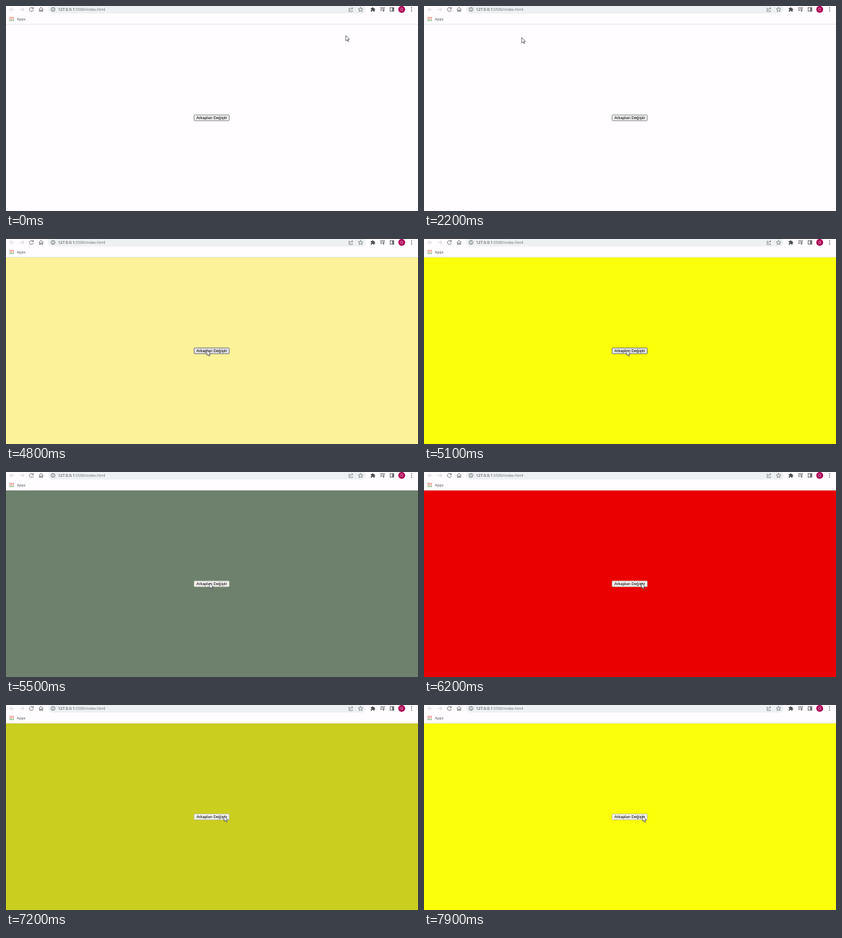
An HTML page that plays this animation: 599 px wide and 299 px high, repeating every 8000 ms.

```html
<!DOCTYPE html>
<html lang="tr">
<head>
<meta charset="utf-8">
<title>Arkaplan Değiştir</title>
<style>
  html, body { margin: 0; width: 100%; height: 100%; overflow: hidden; background: #fffdff; }
  svg { display: block; width: 100%; height: 100%; text-rendering: geometricPrecision; }
  .ui { font-family: "Open Sans", "Noto Sans", sans-serif; }
  .icon { fill: none; stroke: #4c4f53; stroke-width: .75; }
  .thin { stroke-width: .6; }
  .solid { fill: #4c4f53; }
  .off { stroke: #c3c5c8; }
  .apps { stroke-width: 1.4; stroke-dasharray: 1.4 .9; }
  .label { font: 5.9px "Liberation Sans", Arial, sans-serif; }

  #page, #cursor, #button { animation: 8s infinite; }
  #page { animation-name: recolor; animation-timing-function: linear; }
  #cursor { animation-name: move; animation-timing-function: ease-in-out; }
  #button { animation-name: press; animation-timing-function: step-end; }

  @keyframes recolor {
    0%, 57.5% { fill: #fffdff; }
    60% { fill: #fcf29a; }
    62.5%, 65% { fill: #fcff0a; }
    68.75% { fill: #6d816d; }
    72.5% { fill: green; }
    77.5%, 79% { fill: #eb0000; }
    83.75% { fill: #4d5450; }
    92.5%, 100% { fill: #fcff0a; }
  }
  @keyframes move {
    0%, 12.5% { transform: translate(494px, 43px); }
    27.5% { transform: translate(142px, 46px); }
    40% { transform: translate(225px, 184px); }
    54% { transform: translate(290px, 162px); }
    68.75% { transform: translate(296px, 162px); }
    77.5% { transform: translate(316px, 162px); }
    100% { transform: translate(318px, 162px); }
  }
  @keyframes press {
    0% { fill: #efefef; stroke: #767676; }
    54% { fill: #e5e5e8; stroke: #565664; }
    65%, 100% { fill: #f4f3f0; stroke: #b9b9a8; }
  }
</style>
</head>
<body>
<svg viewBox="0 0 599 299" preserveAspectRatio="none">
  <rect id="page" y="27" width="599" height="272"/>

  <rect width="599" height="27" fill="#fffdff"/>
  <rect y="26" width="599" height="1" fill="#e6e5e8"/>
  <rect x="61" y="-1" width="462" height="12" rx="6" fill="#eef1f3"/>

  <g class="icon">
    <path class="off" d="M12 5H6M9 2L6 5L9 8M20 5H26M23 2L26 5L23 8"/>
    <path d="M39.2 3.2A2.9 2.9 0 1 0 39.8 5.8M39.8 1.6V4H37.4"/>
    <path d="M47.8 5L51 2L54.2 5M48.7 4.4V8H50.2V5.8H51.8V8H53.3V4.4"/>
    <circle cx="68.4" cy="5" r="2.8"/>
    <path d="M68.4 4.6V6.6M68.4 3.2V3.9"/>
    <path class="thin" d="M500 3.2H498.8V8H503.8V6.5M500.4 6.2C500.6 4.2 501.6 3.4 504 3.4M502.6 1.9L504.2 3.4L502.6 4.9"/>
    <path class="thin" d="M515.5 1.8L516.5 4L518.8 4.2L517 5.8L517.6 8.1L515.5 6.9L513.4 8.1L514 5.8L512.2 4.2L514.5 4Z"/>
    <path d="M544 2.5H549M544 4.5H549M544 6.5H547M549.6 7V2.5H551"/>
    <circle class="solid" cx="548.8" cy="7" r=".7"/>
    <rect x="558.5" y="2.3" width="5.4" height="5.4"/>
    <path d="M562.6 2.3V7.7" stroke-width="2"/>
  </g>
  <path class="solid" d="M530.3 3H532A1.1 1.1 0 0 1 534.2 3H535.7V4.4A1.1 1.1 0 0 1 535.7 6.6V8.2H534.2A1.1 1.1 0 0 0 532 8.2H530.3V6.6A1.1 1.1 0 0 0 530.3 4.4Z"/>
  <path d="M589.6 2.5V7.6" stroke="#4c4f53" stroke-width="1.5" stroke-linecap="round" stroke-dasharray="0 2.5"/>
  <circle cx="575.3" cy="5" r="5" fill="#ad0055"/>

  <g class="apps">
    <path d="M5.3 16.6H11.3" stroke="#e5483c"/>
    <path d="M5.3 18.9H11.3" stroke="#b96a4c"/>
    <path d="M5.3 21.2H11.3" stroke="#5fa34e"/>
  </g>

  <g class="ui">
    <text x="575.3" y="7" font-size="5.4" text-anchor="middle" fill="#fff">Ö</text>
    <text x="75.6" y="7.1" font-size="5.7" fill="#2c2e31">127.0.0.1<tspan fill="#6b6f74">:5500/index.html</tspan></text>
    <text x="15.8" y="20.9" font-size="5.3" fill="#44474b">Apps</text>
  </g>

  <rect id="button" x="273.4" y="158.9" width="51.2" height="8.4" rx=".8" stroke-width=".8"/>
  <text class="label" x="276.7" y="165.2">Arkaplan Değiştir</text>
  <path id="cursor" d="M0 0V7.8L1.8 6.2L3 9L4.3 8.4L3.1 5.7H5.4Z" fill="#fff" stroke="#34343c" stroke-width=".7" stroke-linejoin="round"/>
</svg>
</body>
</html>
```
